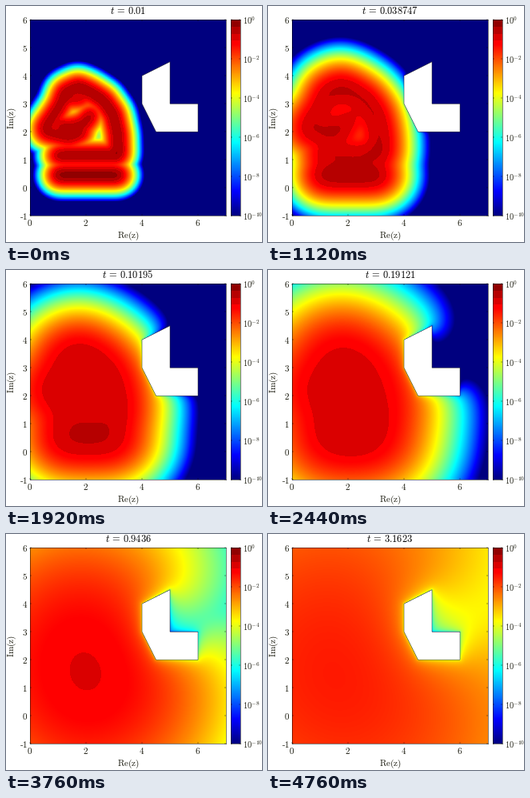
These frames come from a looping animation (320x295 px, 4.8 s). A matplotlib script:

```python
import math

import numpy as np
import matplotlib.pyplot as plt
from matplotlib.animation import FuncAnimation
from matplotlib.colors import ListedColormap
from matplotlib.path import Path

W, H, DPI = 320, 295, 72
FRAMES, INTERVAL = 120, 40
TOP, SIDE = 17.2, 245   # plot square in pixels
N, STEP = 320, 0.05     # periodic solver grid
MAX_DT = 0.012
INK = "#1c1c10"

WALL = np.array([(4, 3), (4, 4), (5, 4.5), (5, 3), (6, 3), (6, 2), (4.5, 2)])

# Chess knight as strokes: (heat per unit length, points)
STROKES = [
    (0.21, [(0.98, 0.45), (3.2, 0.45)]),
    (0.12, [(0.95, 1.15), (3.15, 1.15)]),
    (0.13, [(3.15, 1.15), (3.13, 1.9), (2.98, 2.6), (2.62, 3.12),
            (2.1, 3.45), (1.7, 3.62)]),
    (0.10, [(1.7, 3.62), (1.25, 3.42), (1.08, 2.95), (0.82, 2.55), (0.5, 2.1)]),
    (0.09, [(0.5, 2.0), (1.4, 1.78), (1.9, 2.0)]),
    (0.09, [(1.0, 2.2), (1.5, 2.15), (1.95, 2.3), (2.2, 2.65)]),
    (0.05, [(1.3, 3.2), (1.9, 3.2)]),
]


def heat_points():
    """Point sources (x, y, mass) spread along the strokes."""
    points = []
    for weight, line in STROKES:
        for a, b in zip(line, line[1:]):
            length = math.dist(a, b)
            n = math.ceil(length / 0.05)
            for s in (np.arange(n) + 0.5) / n:
                points.append((a[0] + s * (b[0] - a[0]),
                               a[1] + s * (b[1] - a[1]),
                               weight * length / n))
    return np.array(points).T


def wall_distance(gx, gy):
    """Distance to the wall, zero inside it."""
    dist = np.full(gx.shape, np.inf)
    for (ax, ay), (bx, by) in zip(WALL, np.roll(WALL, -1, axis=0)):
        dx, dy = bx - ax, by - ay
        s = ((gx - ax) * dx + (gy - ay) * dy) / (dx * dx + dy * dy)
        s = np.clip(s, 0, 1)
        dist = np.minimum(dist, np.hypot(gx - ax - s * dx, gy - ay - s * dy))
    spots = np.column_stack([gx.ravel(), gy.ravel()])
    dist[Path(WALL).contains_points(spots).reshape(gx.shape)] = 0
    return dist


def survival(dist, dt):
    """Factor that keeps a linear profile at a cold wall unchanged."""
    s = np.minimum(dist / math.sqrt(2 * dt), 8)
    cdf = 0.5 * (1 + np.tanh(0.79788 * (s + 0.044715 * s ** 3)))
    pdf = np.exp(-s * s / 2) / math.sqrt(2 * math.pi)
    return s / (s * cdf + pdf)


def solve(times):
    """Heat flow around a cold wall, log10 of the field at each time."""
    x = -4.5 + STEP * np.arange(N)
    y = -5.5 + STEP * np.arange(N)
    gx, gy = np.meshgrid(x, y)
    dist = wall_distance(gx, gy)

    t = times[0]
    px, py, mass = heat_points()
    ex = np.exp(-(x[None, :] - px[:, None]) ** 2 / (4 * t))
    ey = np.exp(-(y[None, :] - py[:, None]) ** 2 / (4 * t))
    u = (ey * mass[:, None]).T @ ex / (4 * math.pi * t)
    u[dist == 0] = 0

    k = 2 * math.pi * np.fft.fftfreq(N, STEP)
    kr = 2 * math.pi * np.fft.rfftfreq(N, STEP)
    k2 = k[:, None] ** 2 + kr[None, :] ** 2

    # Linear resampling from the grid to the plot's pixels
    pix = (np.arange(SIDE) + 0.5) * 7 / SIDE
    to_x = np.array([np.interp(pix, x, e) for e in np.eye(N)])
    to_y = np.array([np.interp(pix - 1, y, e) for e in np.eye(N)])

    fields = []
    for goal in times:
        if goal > t:
            n = math.ceil((goal - t) / MAX_DT)
            dt = (goal - t) / n
            decay = np.exp(-k2 * dt)
            keep = survival(dist, dt)
            for _ in range(n):
                u = np.fft.irfft2(np.fft.rfft2(u) * decay, s=(N, N)) * keep
            t = goal
        fields.append(np.log10(np.maximum(to_y.T @ u @ to_x, 1e-10)))
    return fields


def heat_colors():
    v = np.linspace(0, 1, 512)
    ramp = lambda c: np.clip(1.5 - np.abs(4 * v - c), 0, 1)
    red = ramp(3)
    red = np.where(v > 0.875, np.round(red * 7) / 7, red)
    return ListedColormap(np.column_stack([red, ramp(2), ramp(1)]))


def pixel_axes(x, y, w, h, size):
    ax = fig.add_axes([x / W, 1 - (y + h) / H, w / W, h / H])
    for spine in ax.spines.values():
        spine.set_linewidth(0.5)
    ax.tick_params(direction="in", length=2, width=0.4, pad=3,
                   labelsize=size, top=True, right=True, labelcolor=INK)
    return ax


def label(x, y, text, **kw):
    return fig.text(x / W, 1 - y / H, text, size=11.2, color=INK,
                    ha="center", va="center", **kw)


plt.rcParams["mathtext.fontset"] = "cm"
fig = plt.figure(figsize=(W / DPI, H / DPI), dpi=DPI, facecolor="white")

times = np.logspace(-2, 0.5, FRAMES)
fields = solve(times)
style = dict(cmap=heat_colors(), vmin=-10, vmax=0, origin="lower",
             aspect="auto", interpolation="nearest")

ax = pixel_axes(30, TOP, SIDE, SIDE, 11.2)
image = ax.imshow(fields[0], extent=(0, 7, -1, 6), **style)
ax.fill(*WALL.T, facecolor="white", edgecolor="#222222", linewidth=0.5)
ax.set(xlim=(0, 7), ylim=(-1, 6))
ax.set_xticks(range(0, 7, 2), [f"${n}$" for n in range(0, 7, 2)])
ax.set_yticks(range(-1, 7), [r"$\text{-}1$"] + [f"${n}$" for n in range(7)])

bar = pixel_axes(281, TOP, 11.5, SIDE, 10.3)
bar.imshow(np.linspace(-10, 0, 512)[:, None], extent=(0, 1, -10, 0), **style)
bar.set_xticks([])
bar.yaxis.tick_right()
bar.tick_params(axis="y", left=True, right=True)
powers = range(-10, 1, 2)
bar.set_yticks(powers, [f"$10^{{{p}}}$" for p in powers])

label(152.5, 287.5, r"$\mathrm{Re(z)}$")
label(7, 140.5, r"$\mathrm{Im(z)}$", rotation=90)
title = fig.text(152.5 / W, 1 - 10 / H, "", size=12.4, color="black",
                 ha="center", va="baseline")


def update(i):
    image.set_data(fields[i])
    title.set_text(rf"$t\,=\,{times[i]:.5g}$")
    return image, title


anim = FuncAnimation(fig, update, frames=FRAMES, interval=INTERVAL,
                     repeat=True, repeat_delay=0)
plt.show()
```
